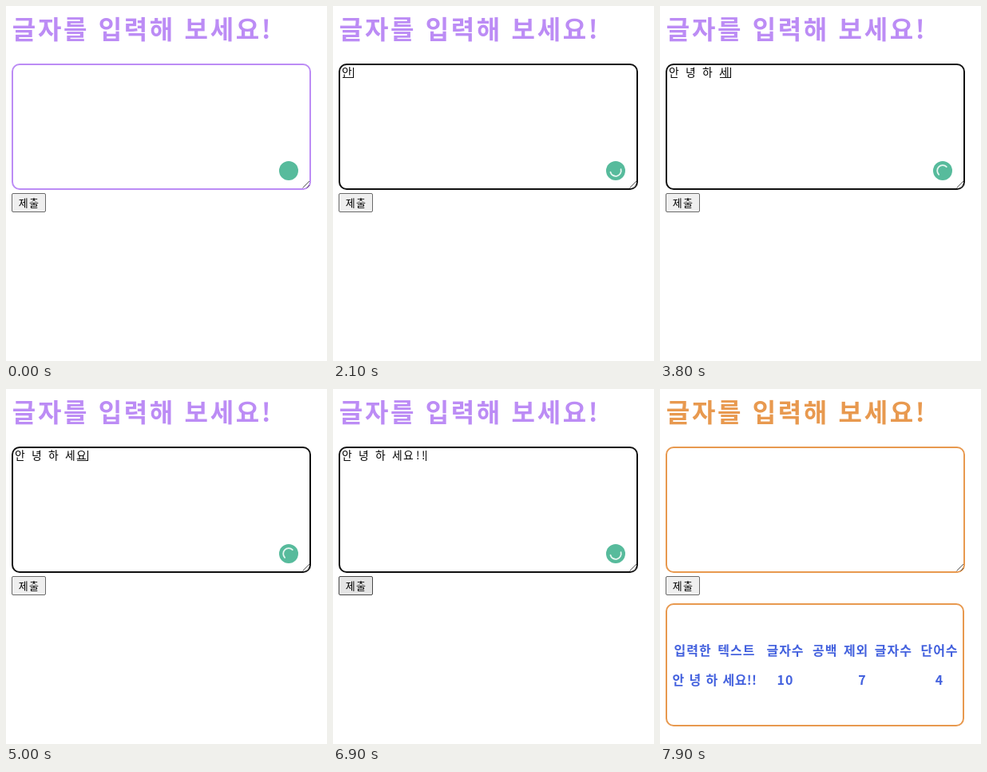
Animation of 402 by 444 pixels, one loop 8000 ms. Source, as an HTML page:

```html
<!DOCTYPE html>
<html lang="ko">
<head>
<meta charset="utf-8">
<title>글자 수 세기</title>
<style>
html, body { margin: 0; width: 100%; height: 100%; overflow: hidden; background: #fff; }
svg { display: block; --theme: #bc8cf5; font-family: "Noto Sans CJK KR", "Noto Sans CJK", sans-serif; }
svg.done { --theme: #e8994f; }
text { white-space: pre; }
.title { font-size: 32px; font-weight: 700; letter-spacing: 2.65px; fill: var(--theme); }
.frame { fill: #fff; stroke: var(--theme); stroke-width: 2; }
.focus #box { stroke: #101010; }
#button { fill: #efefef; stroke: #6a6a6a; }
.hover #button { fill: #e4e4e4; stroke: #4a4a4a; }
.label { font-size: 13px; letter-spacing: 1.3px; }
#typed { font-size: 13.8px; fill: #000; }
.cells { font-size: 16px; font-weight: 700; letter-spacing: 1px; word-spacing: 2px; text-anchor: middle; fill: #4361de; }
.cells .entry { letter-spacing: .4px; word-spacing: 1px; }
#result { display: none; }
.done #result { display: block; }
</style>
</head>
<body>
<svg id="stage" width="402" height="444" viewBox="0 0 402 444">
  <text class="title" x="7.8" y="41">글자를 입력해 보세요!</text>
  <rect id="box" class="frame" x="8" y="73" width="373" height="156" rx="9"/>
  <path d="M371.5 227.5L380 219M376.5 227.5L380 224" stroke="#555" fill="none"/>
  <text id="typed" y="88"></text>
  <path id="underline" stroke="#181818"/>
  <path id="caret" stroke="#000"/>
  <g id="badge">
    <circle cx="354" cy="206" r="12" fill="#57bb9c"/>
    <path id="spinner" d="M347.2 206a6.8 6.8 0 0 1 13.6 0" fill="none" stroke="#e6f6f0" stroke-width="1.8" stroke-linecap="round"/>
  </g>
  <rect id="button" x="7.5" y="234.5" width="42" height="23" rx="1.5"/>
  <text class="label" x="15.7" y="251">제출</text>
  <g id="result">
    <rect class="frame" x="8" y="269" width="372" height="152" rx="9"/>
    <g class="cells">
      <text x="68.5" y="333">입력한 텍스트</text>
      <text x="157" y="333">글자수</text>
      <text x="253.5" y="333">공백 제외 글자수</text>
      <text x="350" y="333">단어수</text>
      <text class="entry" x="68.5" y="370">안 녕 하 세요!!</text>
      <text x="157" y="370">10</text>
      <text x="253.5" y="370">7</text>
      <text x="350" y="370">4</text>
    </g>
  </g>
</svg>
<script>
const LOOP = 8000, FOCUS = 1100, SPIN = 1900, HOVER = 6600, BLUR = 7500, HIDE = 7600, DONE = 7800;

// time, text, whether the last syllable is still being composed
const keys = [
  [FOCUS, ""], [1600, "ㅇ", true], [1700, "아", true], [1900, "안", true],
  [2400, "안 "], [2600, "안 ㄴ", true], [2800, "안 녀", true], [2900, "안 녕", true],
  [3100, "안 녕 "], [3300, "안 녕 ㅎ", true], [3400, "안 녕 하", true],
  [3600, "안 녕 하 "], [3700, "안 녕 하 ㅅ", true], [3800, "안 녕 하 세", true],
  [4600, "안 녕 하 세ㅇ", true], [4800, "안 녕 하 세요", true],
  [5600, "안 녕 하 세요!"], [5900, "안 녕 하 세요!!"]
];

const $ = id => document.getElementById(id);
const stage = $("stage"), typed = $("typed"), underline = $("underline");
const caret = $("caret"), badge = $("badge"), spinner = $("spinner");
const show = (el, on) => el.setAttribute("visibility", on ? "visible" : "hidden");
const wide = c => c > "\u3000";

function layout(text) {
  let x = 11;
  const xs = [...text].map(c => {
    const at = x + (wide(c) ? 0 : 2);
    x += wide(c) ? 14 : 7;
    return at;
  });
  return { xs, end: x };
}

function draw(now) {
  const t = now % LOOP;
  const focus = t >= FOCUS && t < BLUR;
  const done = t >= DONE;
  stage.classList.toggle("focus", focus);
  stage.classList.toggle("hover", t >= HOVER && !done);
  stage.classList.toggle("done", done);

  const [start, text, composing] = keys.filter(k => k[0] <= t).pop() || [0, ""];
  const { xs, end } = layout(text);
  if (typed.textContent !== text) {
    typed.textContent = text;
    typed.setAttribute("x", xs.join(" ") || "11");
  }
  show(typed, !done);
  underline.setAttribute("d", `M${end - 13} 89.5H${end}`);
  show(underline, focus && composing);
  caret.setAttribute("d", `M${end + 0.5} 77V90`);
  show(caret, focus && (t - start) % 1000 < 500);

  show(badge, t < HIDE);
  spinner.setAttribute("visibility", t >= SPIN && t < HIDE ? "inherit" : "hidden");
  const step = Math.floor(t / 100) * 100;
  spinner.setAttribute("transform", `rotate(${165 + (step - 2100) * 0.3} 354 206)`);
}

function tick() {
  draw(performance.now());
  requestAnimationFrame(tick);
}
tick();
</script>
</body>
</html>
```
